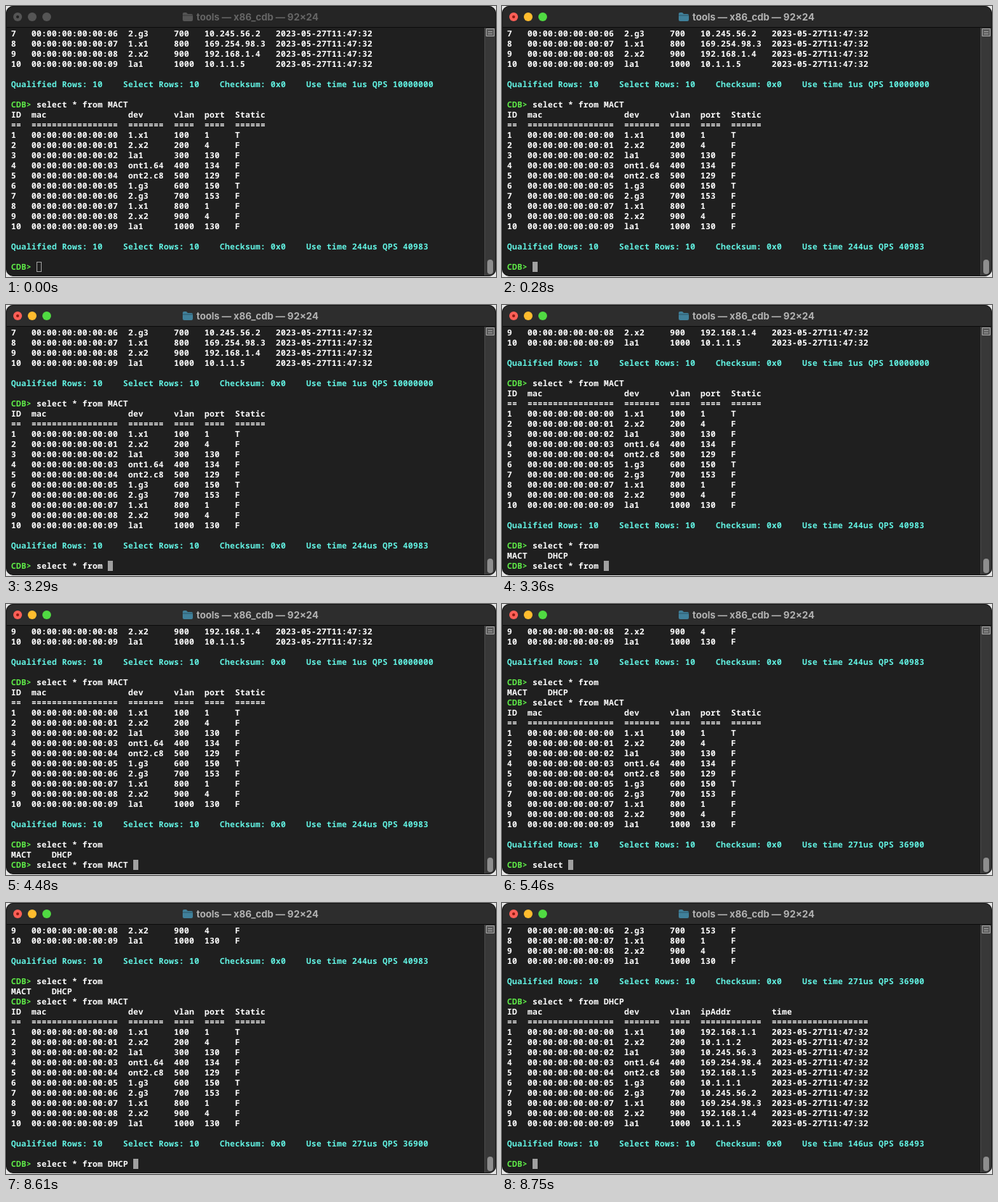
An HTML page for the animation above (9.45 s loop, 674x374 px).

```html
<!DOCTYPE html>
<html lang="en">
<head>
<meta charset="utf-8">
<title>Terminal</title>
<style>
  html, body { margin: 0; width: 100%; height: 100%; overflow: hidden; background: #e6e6e6; }
  #win { position: absolute; inset: 0 0 1px; border-radius: 10px; overflow: hidden; background: #1f1f1f; }
  #win::after { content: ""; position: absolute; inset: 0; border: 1px solid #141414; border-radius: 10px; }
  svg { position: absolute; left: 0; top: 0; }
  #bar { fill: #2d2d2d; }
  #title { font: 700 13.15px Inter, sans-serif; fill: #b2b2b2; }
  #folder { fill: #40809a; }
  .idle #bar { fill: #252525; }
  .waking #bar { fill: #292929; }
  .blur #title { fill: #656565; }
  .blur #folder { fill: #555; }
  .blur .button { fill: #555; }
  .blur #dot { fill: #222; }
  #text {
    position: absolute; left: 7px; top: 32px; margin: 0; color: #fff;
    font: 600 11.3px/14px "Noto Sans Mono", monospace;
    letter-spacing: calc(7px - 1ch); text-rendering: geometricPrecision;
  }
  #text b { font-weight: inherit; color: #5fec48; }
  #text i { font-style: normal; color: #62f3e3; }
  #cursor { position: absolute; top: 353px; width: 7px; height: 14px; box-sizing: border-box; background: #a0a0a0; }
  .blur #cursor { background: none; border: 1px solid #a0a0a0; }
</style>
</head>
<body>
<div id="win">
  <svg width="674" height="374">
    <rect id="bar" width="674" height="29"/>
    <rect y="29" width="674" height="1" fill="#0c0c0c"/>
    <circle class="button" cx="16" cy="15" r="6" fill="#fe5f57"/>
    <circle id="dot" cx="16" cy="15" r="2" fill="#8c1a10"/>
    <circle class="button" cx="36" cy="15" r="6" fill="#febc2e"/>
    <circle class="button" cx="56" cy="15" r="6" fill="#50da42"/>
    <path id="folder" d="M243 11q0-2 2-2h3l2 2h5q2 0 2 2v6q0 2-2 2h-10q-2 0-2-2z"/>
    <path d="M243 13h14" stroke="#0005"/>
    <text id="title" x="262" y="19.5">tools — x86_cdb — 92×24</text>
    <rect x="658" y="30" width="16" height="344" fill="#383838"/>
    <path d="M658.5 30v344" stroke="#4a4a4a"/>
    <path d="M660.5 31.5h11v10h-11zM663 35.5h6M663 38.5h6" fill="#5c5c5c" stroke="#a4a4a4"/>
    <rect x="662" y="350" width="8" height="20" rx="4" fill="#8e8e8e"/>
  </svg>
  <pre id="text"></pre>
  <div id="cursor"></div>
</div>
<script>
const LOOP = 9450, ROWS = 24;
const $ = id => document.getElementById(id);
const devs = '1.x1 2.x2 la1 ont1.64 ont2.c8 1.g3 2.g3 1.x1 2.x2 la1'.split(' ');
const ports = '1 4 130 134 129 150 153 1 4 130'.split(' ');
const ips = ('192.168.1.1 10.1.1.2 10.245.56.3 169.254.98.4 192.168.1.5 ' +
  '10.1.1.1 10.245.56.2 169.254.98.3 192.168.1.4 10.1.1.5').split(' ');

const prompt = text => `<b>CDB&gt;</b> ${text}`;

function table(columns, stats) {
  const line = cell => columns.map(c => cell(c).padEnd(c.width + 2)).join('');
  return [
    line(c => c.name),
    line(c => '='.repeat(c.width)),
    ...devs.map((_, i) => line(c => c.value(i))),
    '',
    `<i>Qualified Rows: 10    Select Rows: 10    Checksum: 0x0    Use time ${stats}</i>`,
    ''
  ];
}

const col = (name, width, value) => ({ name, width, value });
const common = [
  col('ID', 2, i => `${i + 1}`),
  col('mac', 17, i => `00:00:00:00:00:0${i}`),
  col('dev', 7, i => devs[i]),
  col('vlan', 4, i => `${(i + 1) * 100}`)
];
const mact = stats => table([...common,
  col('port', 4, i => ports[i]),
  col('Static', 6, i => i % 5 ? 'F' : 'T')], stats);
const dhcp = stats => table([...common,
  col('ipAddr', 12, i => ips[i]),
  col('time', 19, () => '2023-05-27T11:47:32')], stats);

// [time, typed text, lines printed just before the prompt]
const query = 'select * from ';
const steps = [
  [0, '', [...dhcp('1us QPS 10000000'), prompt(query + 'MACT'), ...mact('244us QPS 40983')]],
  [1330, 's'],
  [1680, 'se'],
  [1960, 'sel'],
  [2030, 'select '],
  [2800, 'select * '],
  [3290, query],
  [3360, query, [prompt(query), 'MACT    DHCP']],
  [3920, query + 'M'],
  [4130, query + 'MACT '],
  [4550, '', [prompt(query + 'MACT'), ...mact('271us QPS 36900')]],
  [5180, 's'],
  [5390, 'se'],
  [5460, 'select '],
  [6300, 'select *'],
  [6370, 'select * '],
  [6790, query],
  [7350, query + 'D'],
  [7420, query + 'DH'],
  [7490, query + 'DHCP '],
  [8680, '', [prompt(query + 'DHCP'), ...dhcp('146us QPS 68493')]]
];

const log = [];
const screens = steps.map(([time, typed, output = []]) => {
  log.push(...output);
  return { time, typed, html: [...log, prompt(typed)].slice(-ROWS).join('\n') };
});

let shown;
function draw() {
  const t = performance.now() % LOOP;
  const screen = screens.findLast(s => s.time <= t);
  if (screen !== shown) {
    shown = screen;
    $('text').innerHTML = screen.html;
    $('cursor').style.left = 7 * (6 + screen.typed.length) + 'px';
  }
  $('win').className = t < 70 ? 'blur idle' : t < 280 ? 'idle' : t < 350 ? 'waking' : '';
  requestAnimationFrame(draw);
}
draw();
</script>
</body>
</html>
```
